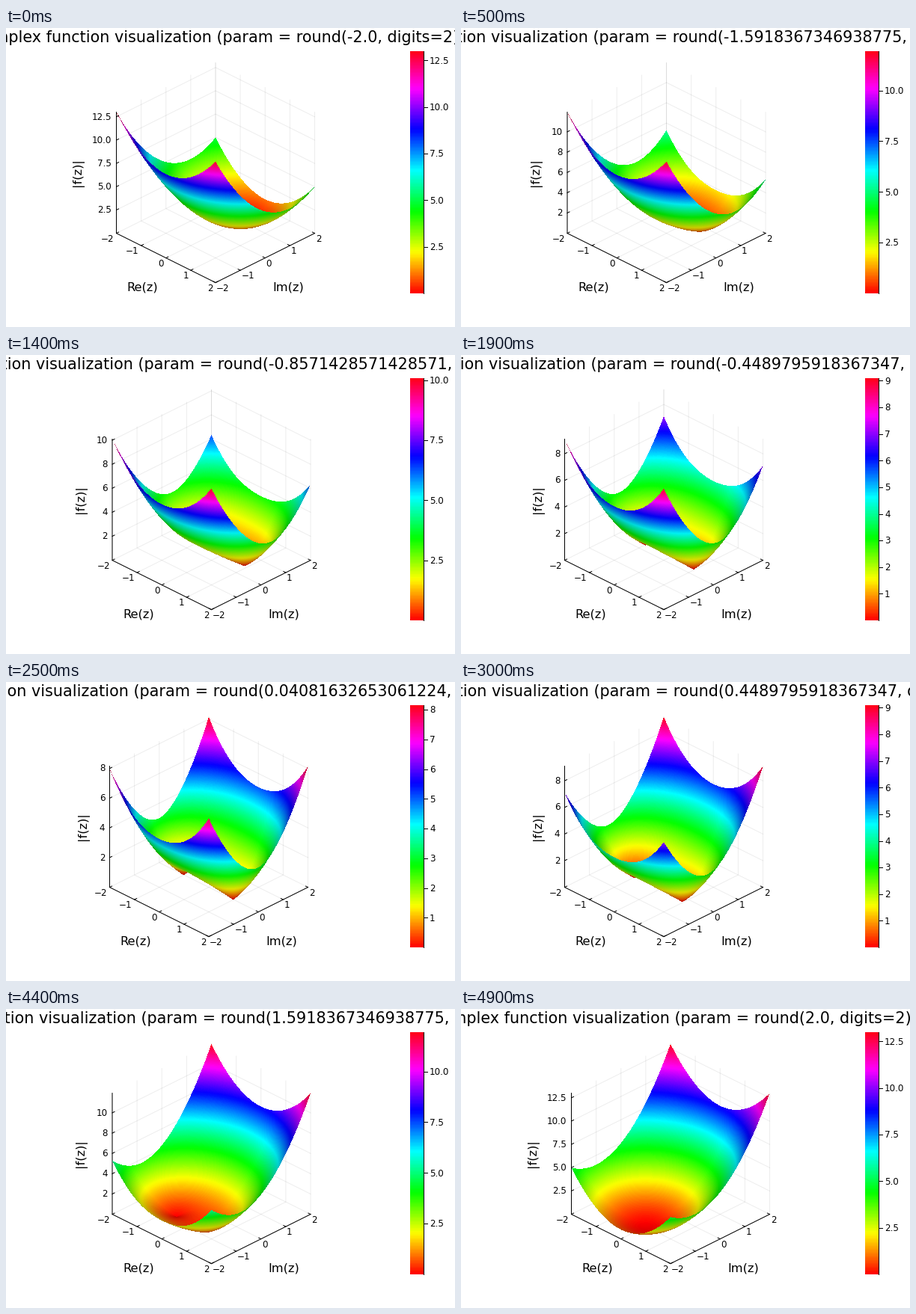
Write a matplotlib script that moves like this. It is 600 px wide and 400 px high and loops after 5000 ms.

```python
import numpy as np
import matplotlib
import matplotlib.pyplot as plt
from matplotlib.animation import FuncAnimation

W, H, DPI = 600, 400, 100
FRAMES, INTERVAL = 50, 100
PX = 72 / DPI                      # points per pixel
TICK, GUIDE, TITLE = 11.85, 16.3, 20.74
HALF, RISE, TALL, BASE = 132.5, 66, 162, 274.6
BAR_X0, BAR_X1, BAR_TOP, BAR_BOTTOM = 540, 558, 31, 355
VIEW = np.array([0.612, -0.612, 0.5])
SAMPLES = 1100                     # surface samples per pixel column

plt.rcParams["font.family"] = "DejaVu Sans"
hsv = matplotlib.colormaps["hsv"]

fig = plt.figure(figsize=(W / DPI, H / DPI), dpi=DPI, facecolor="white")
ax = fig.add_axes([0, 0, 1, 1])


def project(x, y, w, cx):
    """Orthographic view; w is the height as a fraction of the box."""
    return cx + HALF * (x + y) / 4, BASE + RISE * (x - y) / 4 - TALL * w


def line(points, **style):
    xs, ys = zip(*points)
    ax.plot(xs, ys, **{"color": "black", "lw": PX, "zorder": 2, **style})


def label(x, y, text, size=TICK, **style):
    ax.text(x, y, text, fontsize=size * PX, **{"va": "baseline", **style})


def shade(z, f, height, param, top):
    """Colour by height, dimmed where the surface is seen edge-on."""
    grad = np.conj(2 * z + param) * f / (height + 1e-9) * 4 / top
    facing = -grad.imag * VIEW[0] - grad.real * VIEW[1] + VIEW[2]
    facing = np.abs(facing) / np.sqrt(1 + np.abs(grad) ** 2)
    light = np.minimum(1, 0.68 + 0.5 * facing)
    return hsv((height / top * 255).astype(int))[:, :3] * light[:, None]


def render_surface(param, top, cx):
    # Every pixel column is one slice x + y = const, walked from far to near.
    cols = np.arange(int(np.ceil(cx - HALF - 0.5)), int(cx + HALF - 0.5) + 1)
    total = (cols + 0.5 - cx) * 4 / HALF
    depth = np.linspace(-1, 1, SAMPLES)[:, None] * (4 - np.abs(total))
    x, y = (total + depth) / 2, (total - depth) / 2
    z = y + 1j * x
    f = z * z + param * z + 1
    height = np.abs(f)
    _, py = project(x, y, height / top, cx)

    # A pixel is painted where a slice passes its centre; nearer paint wins.
    row = np.floor(py - 0.5).astype(int)
    step, col = np.nonzero(row[1:] != row[:-1])
    rows = np.maximum(row[step, col], row[step + 1, col])
    image = np.zeros((H, W, 4))
    image[rows, cols[col], :3] = shade(z[step, col], f[step, col],
                                       height[step, col], param, top)
    image[rows, cols[col], 3] = 1
    return np.clip(image, 0, 1)


def ticks_up_to(top, step):
    return np.arange(1, int(top / step + 1e-9) + 1) * step


def tick_text(value, step):
    text = f"{value:.1f}" if step == 2.5 else f"{value:.0f}"
    return text.replace("-", "\u2212")


def draw_box(top, cx, guide_x):
    step = 2 if top < 12 else 2.5
    z_ticks = ticks_up_to(top, step)
    grid = dict(color="black", alpha=0.07, zorder=1)

    def at(x, y, w):
        return project(x, y, w, cx)

    for t in range(-2, 3):
        line([at(t, -2, 0), at(t, 2, 0), at(t, 2, 1)], **grid)
        line([at(2, t, 0), at(-2, t, 0), at(-2, t, 1)], **grid)
    for v in z_ticks:
        w = v / top
        line([at(-2, -2, w), at(-2, 2, w), at(2, 2, w)], **grid)

    line([at(-2, -2, 1), at(-2, -2, 0), at(2, -2, 0), at(2, 2, 0)])

    for t in range(-2, 3):
        x, y = at(t, -2, 0)
        line([(x, y), (x + 3, y - 1.5)])
        label(x - 2.8, y + 11.2, tick_text(t, 1), ha="right")
        x, y = at(2, t, 0)
        line([(x, y), (x - 3, y - 1.5)])
        label(x + 1.2, y + 11.2, tick_text(t, 1), ha="left")
    for v in z_ticks:
        x, y = at(-2, -2, v / top)
        line([(x, y), (x + 3, y - 1.5)])
        label(x - 6.2, y + 3.7, tick_text(v, step), ha="right")

    label(cx - 97.7, 352, "Re(z)", GUIDE, ha="center")
    label(cx + 97, 352, "Im(z)", GUIDE, ha="center")
    label(guide_x, 193.5, "|f(z)|", GUIDE, ha="center", va="center", rotation=90)


def draw_colorbar(top):
    ramp = np.linspace(1, 0, 256)[:, None]
    ax.imshow(ramp, cmap=hsv, vmin=0, vmax=1, aspect="auto",
              interpolation="nearest", zorder=2,
              extent=(BAR_X0, BAR_X1, BAR_BOTTOM, BAR_TOP))
    line([(BAR_X1, BAR_TOP), (BAR_X1, BAR_BOTTOM)], zorder=3)
    step = 1 if top <= 10 else 2.5
    for v in ticks_up_to(top, step):
        y = BAR_BOTTOM - (BAR_BOTTOM - BAR_TOP) * v / top
        line([(BAR_X1, y), (BAR_X1 + 5, y)], zorder=3)
        label(BAR_X1 + 8, y + 4.3, tick_text(v, step), ha="left")


def update(frame):
    ax.clear()
    ax.axis("off")
    param = (4 * frame - 98) / 49
    a = 2 * abs(param)
    top = np.hypot(1 + a, 8 + a)

    # The plot moves aside to make room for wider height labels.
    if top < 10:
        cx, guide_x = 271, 103
    elif top < 12:
        cx, guide_x = 274.5, 100
    else:
        cx, guide_x = 280, 95.5

    draw_box(top, cx, guide_x)
    ax.imshow(render_surface(param, top, cx), extent=(0, W, H, 0),
              aspect="auto", interpolation="nearest", zorder=4)
    draw_colorbar(top)
    label(cx + 4.5, 19, "Complex function visualization "
          f"(param = round({param}, digits=2))", TITLE, ha="center")
    ax.set_xlim(0, W)
    ax.set_ylim(H, 0)
    return []


anim = FuncAnimation(fig, update, frames=FRAMES, interval=INTERVAL,
                     repeat=True, repeat_delay=0, blit=False)
plt.show()
```
